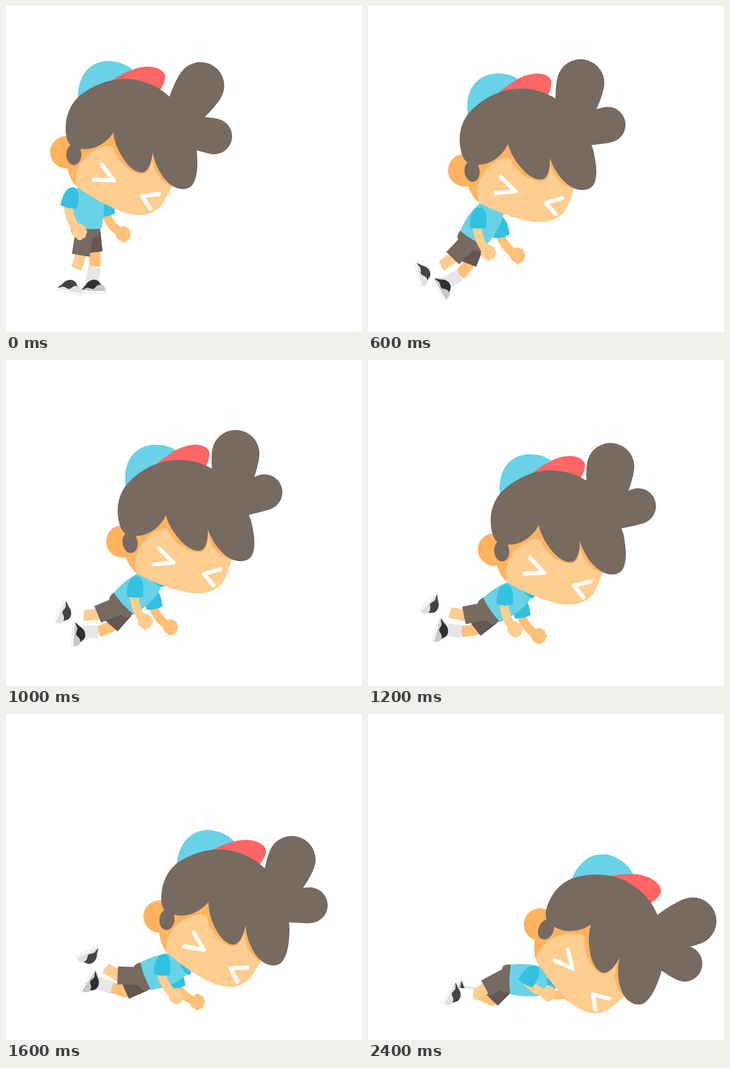
Write an HTML page with a canvas that moves like this. It is 614 px wide and 564 px high and loops after 2.6 s.

```html
<!DOCTYPE html>
<html lang="en">
<head>
<meta charset="utf-8">
<title>Falling boy</title>
<style>
  html, body { margin: 0; width: 100%; height: 100%; overflow: hidden; background: #fff; }
  canvas { display: block; }
</style>
</head>
<body>
<canvas id="stage" width="614" height="564"></canvas>
<script>
const ctx = document.getElementById('stage').getContext('2d');
const STEP = 200, FRAMES = 13;

const HAIR = '#766a61', SHORTS_FAR = '#635752';
const BLUE = '#69d2e7', BLUE_DARK = '#32c1e0', RED = '#ff6666';
const SKIN = '#ffcd90', SKIN_FAR = '#ffc078', SKIN_SHADE = '#ffb35f';

// The head leads the fall; everything else hangs from it.
const fall = {
  x: [215, 259, 298, 330, 373, 390, 390],
  y: [276, 281, 304.5, 339.5, 385, 417.5, 428.5],
  tilt: [0, -6.4, -9, -5.8, 6, 16, 22.8],
  tuftTop: [-57, -66, -73, -76, -74, -21, -45],
  tuftSide: [11, 1, -9, -12, -9, 29, 4]
};

// Joint angles at even times over the fall, and bone lengths
const nearLeg = {
  hip: [-4, 8], lengths: [40, 25, 43],
  thigh: [99, 146, 182, 152], shin: [108, 160, 211, 149],
  foot: [108, 176, 222, 188], shoe: [13, 96, 153, 116],
  skin: SKIN, sock: '#fff', toe: '#e0e0e0', back: '#444', shorts: HAIR, width: 31
};
const farLeg = {
  hip: [10, 6], lengths: [36, 25, 45],
  thigh: [84, 121, 156, 135], shin: [90, 144, 196, 206],
  foot: [93, 162, 198, 189], shoe: [2, 79, 123, 121],
  skin: SKIN_FAR, sock: '#e6e6e6', toe: '#c8c8c8', back: '#2f2f2f', shorts: SHORTS_FAR, width: 27
};

const path = d => new Path2D(d);
const shapes = {
  cap: path('M124 160C123 120 145 95 177 95C198 96 210 103 219 111L190 150Z'),
  brim: path('M178 131C200 118 222 104 248 105C270 107 279 118 273 131C271 138 268 142 264 147L230 165Z'),
  face: path('M104 235C101 265 105 295 122 313C150 333 180 349 205 357C235 366 255 360 268 345C275 334 281 322 287 310L300 200L120 200Z'),
  faceLight: path('M121 312C117 290 125 275 140 259C152 249 165 242 178 242C186 241 186 250 190 258C200 276 218 290 235 291C246 290 251 275 253 256C250 278 262 302 286 312C281 322 275 334 268 345C255 360 235 366 205 357C180 349 150 333 121 312Z'),
  hair: path('M103 212C103 185 114 168 125 157C150 136 180 126 205 126C235 127 262 138 281 156C305 178 322 210 329 250C331 275 331 295 322 309C316 317 304 319 292 314C270 303 257 275 253 253C251 270 247 282 239 287C230 291 217 283 208 272C195 255 187 237 185 219C176 234 153 251 130 247C125 252 114 245 109 238C104 230 103 222 103 212Z'),
  eyes: path('M165 274L186 302L152 300M264 325L235 329L249 351'),
  tuftTop: path('M-90 -22C-55 -33 -25 -41 0 -41A41 41 0 0 1 0 41C-25 41 -55 33 -90 22Z'),
  tuftSide: path('M-70 -26C-40 -26 -20 -31 0 -31A31 31 0 0 1 0 31C-20 31 -40 26 -70 26Z'),
  shirt: path('M-26 0C-30 -25 -26 -50 -17 -72L20 -72C30 -50 30 -25 25 0Q0 4 -26 0Z'),
  pelvis: path('M-26 -4L24 -4L21 14Q-3 22 -24 13Q-28 8 -26 -4Z'),
  sleeve: path('M-14 17C-15 0 -10 -18 2 -18C13 -18 16 0 14 17Q0 21 -14 17Z'),
  shoe: path('M-21 -3C-18 -14 -8 -22 3 -22C8 -22 11 -18 13 -15C19 -13 21 -8 21 -3Z'),
  shoeBack: path('M-21 -4Q-14 -11 -12 -15C-8 -22 2 -25 8 -20L13 -14C8 -15 5 -12 2 -8C-2 -4 -6 -9 -12 -8Q-17 -5 -21 -4Z')
};

// Catmull-Rom through evenly spaced values, t from 0 to 1
function spline(list, t) {
  const last = list.length - 1, u = t * last;
  const i = Math.min(Math.floor(u), last - 1), f = u - i;
  const [a, b, c, d] = [-1, 0, 1, 2].map(n => list[Math.max(0, Math.min(last, i + n))]);
  return b + f / 2 * (c - a + f * (2 * a - 5 * b + 4 * c - d + f * (3 * (b - c) + d - a)));
}

function smooth(from, to, v) {
  const f = Math.max(0, Math.min(1, (v - from) / (to - from)));
  return f * f * (3 - 2 * f);
}

const rad = deg => deg * Math.PI / 180;

function local([x, y, deg], px, py) {
  const c = Math.cos(rad(deg)), s = Math.sin(rad(deg));
  return [x + px * c - py * s, y + px * s + py * c];
}

const reach = ([x, y], deg, length) => local([x, y, deg], length, 0);

function place([x, y, deg], draw) {
  ctx.save();
  ctx.translate(x, y);
  ctx.rotate(rad(deg));
  draw();
  ctx.restore();
}

function fill(shape, color) {
  ctx.fillStyle = color;
  ctx.fill(shape);
}

function oval(x, y, rx, ry, color) {
  ctx.fillStyle = color;
  ctx.beginPath();
  ctx.ellipse(x, y, rx, ry, 0, 0, 7);
  ctx.fill();
}

function line(points, width, color) {
  ctx.beginPath();
  points.forEach(p => ctx.lineTo(...p));
  ctx.lineWidth = width;
  ctx.strokeStyle = color;
  ctx.stroke();
}

function arm(sleeve, deg, length, color) {
  const shoulder = local(sleeve, -2, 12);
  const elbow = local([...shoulder, deg], length / 2, 9);
  const [x, y] = reach(shoulder, deg, length);
  ctx.beginPath();
  ctx.moveTo(...shoulder);
  ctx.quadraticCurveTo(...elbow, x, y);
  ctx.lineWidth = 15;
  ctx.strokeStyle = color;
  ctx.stroke();
  oval(x, y, 12, 11.5, color);
  for (let knuckle = -80; knuckle <= 80; knuckle += 40) oval(...reach([x, y], knuckle, 9), 5.5, 5.5, color);
}

function leg(look, torso, t) {
  const [thigh, shin, foot] = look.lengths;
  const hip = local(torso, ...look.hip);
  const hem = reach(hip, spline(look.thigh, t), thigh);
  const ankle = reach(hem, spline(look.shin, t), shin);
  const shoe = [...reach(ankle, spline(look.foot, t), foot), spline(look.shoe, t)];
  line([hip, hem, ankle], 19, look.skin);
  line([ankle, local(shoe, -4, -14)], 22, look.sock);
  place(shoe, () => {
    fill(shapes.shoe, look.toe);
    fill(shapes.shoeBack, look.back);
    ctx.fillStyle = '#ddd';
    ctx.fillRect(-21.5, -3, 43, 3.5);
    ctx.fillStyle = '#fff';
    ctx.fillRect(-21, -3, 42, 2.5);
  });
  line([hip, hem], look.width, look.shorts);
}

function tuft(head, shape, y, deg, length) {
  const tip = reach(local(head, 90, y), head[2] + deg - head[2], length);
  place([...tip, deg], () => fill(shape, HAIR));
}

function drawHead(head) {
  place(head, () => {
    ctx.translate(-215, -276);
    oval(104, 253, 28, 28, SKIN_SHADE);
    fill(shapes.cap, BLUE);
    fill(shapes.brim, RED);
    fill(shapes.face, SKIN_SHADE);
    fill(shapes.faceLight, SKIN);
    fill(shapes.hair, HAIR);
    oval(117, 257, 13, 18, HAIR);
    ctx.lineCap = 'round';
    ctx.lineWidth = 7;
    ctx.strokeStyle = '#fff';
    ctx.stroke(shapes.eyes);
  });
}

function draw(t) {
  const u = 6 * t;
  const head = [spline(fall.x, t), spline(fall.y, t), spline(fall.tilt, t)];

  // The torso swings up behind the neck.
  const turn = 2 + 20.5 * u - 0.95 * u * u;
  const neck = local(head, -70 + 2.7 * u, 37 + 4 * u);
  const torso = [...local([...neck, turn], -3, 71), turn];

  // The shoulder settles at once; the arms fold on landing.
  const settle = Math.exp(-1.6 * u), fold = smooth(3, 6, u);
  const sleeve = [...local(torso, -9 - 21 * settle, -34 - 18 * settle), 12 * settle + 30 * t ** 5];
  const sleeveFar = [...local(torso, 30 - 0.64 * u * u, -40 - 0.42 * u * u), -12];

  ctx.clearRect(0, 0, 614, 564);
  ctx.lineJoin = 'round';
  arm(sleeveFar, 52 - 47 * fold, 48 - 4 * fold, SKIN_FAR);
  place(sleeveFar, () => fill(shapes.sleeve, BLUE_DARK));
  leg(farLeg, torso, t);
  leg(nearLeg, torso, t);
  place(torso, () => {
    fill(shapes.pelvis, HAIR);
    fill(shapes.shirt, BLUE);
    oval(3, -71, 21, 8, BLUE_DARK);
  });
  arm(sleeve, 69 - 38 * fold, 52 - 8 * fold, SKIN);
  place(sleeve, () => fill(shapes.sleeve, BLUE_DARK));

  tuft(head, shapes.tuftSide, -61, spline(fall.tuftSide, t) + head[2], 55);
  tuft(head, shapes.tuftTop, -91, spline(fall.tuftTop, t) + head[2], 56);
  drawHead(head);
}

const start = performance.now();
function tick() {
  const step = Math.floor((performance.now() - start) / STEP) % FRAMES;
  draw(step / (FRAMES - 1));
  requestAnimationFrame(tick);
}
tick();
</script>
</body>
</html>
```
